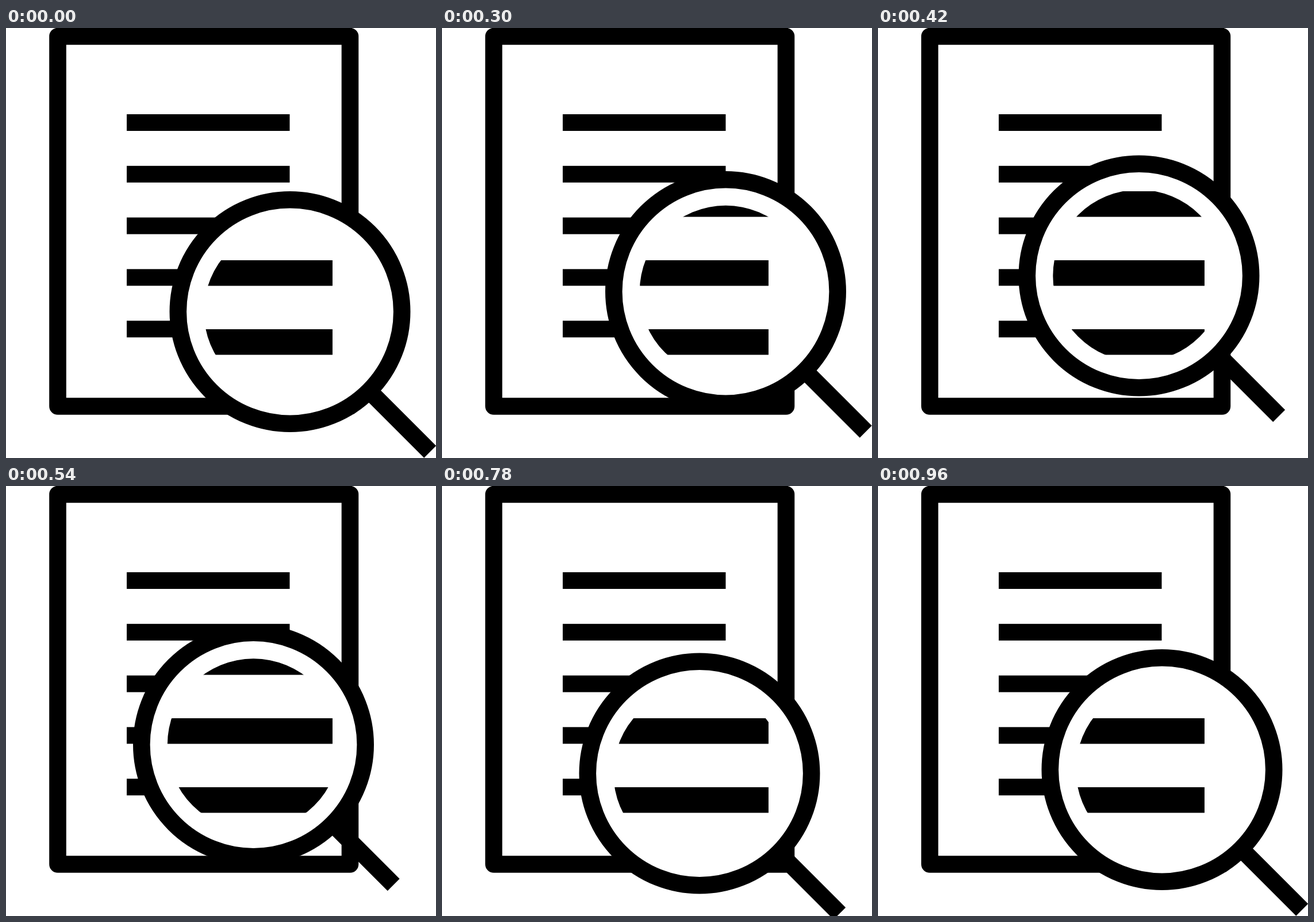
Recreate the animation shown at these times as an HTML page with a canvas. Size 748 by 748 pixels, loop 1.05 s.

```html
<!DOCTYPE html>
<html lang="en">
<head>
<meta charset="utf-8">
<title>Document search</title>
<style>
  html, body { margin: 0; height: 100%; overflow: hidden; background: #fff; }
  canvas { display: block; }
</style>
</head>
<body>
<canvas id="stage" width="748" height="748"></canvas>
<script>
const ctx = document.getElementById('stage').getContext('2d');
const LOOP = 1050, STEP = 60;

// Lens centre: [ms, x, y]
const path = [
  [120, 494, 493.5], [300, 493.5, 458.5], [420, 454, 431], [540, 430.5, 450],
  [660, 421, 478.5], [780, 448, 500], [960, 494, 493.5]
];

function slope(i, axis) {
  const a = path[Math.max(i - 1, 0)], b = path[Math.min(i + 1, path.length - 1)];
  return (b[axis] - a[axis]) / (b[0] - a[0]);
}

// Smooth cubic curve through the path points
function lensAt(ms) {
  const t = Math.min(Math.max(ms, 120), 960);
  let i = 0;
  while (i < path.length - 2 && t >= path[i + 1][0]) i++;
  const a = path[i], b = path[i + 1], span = b[0] - a[0];
  const u = (t - a[0]) / span, v = 1 - u;
  return [1, 2].map(k =>
    a[k] * v * v * (1 + 2 * u) + b[k] * u * u * (3 - 2 * u) +
    span * u * v * (slope(i, k) * v - slope(i + 1, k) * u));
}

function drawPage() {
  ctx.strokeRect(90, 14.5, 508.5, 643.5);
  for (let i = 0; i < 5; i++) ctx.fillRect(210, 150 + i * 89.8, 283.5, 29);
}

function drawLens(x, y) {
  ctx.save();
  ctx.filter = 'blur(0.6px)'; // soft edges on the glass and handle
  ctx.beginPath();
  ctx.moveTo(x + 140, y + 140);
  ctx.lineTo(x + 243.7, y + 243.7);
  ctx.stroke();

  ctx.beginPath();
  ctx.arc(x, y, 194.7, 0, Math.PI * 2);
  ctx.fillStyle = '#fff';
  ctx.fill();
  ctx.stroke();
  ctx.restore();

  // Enlarged text lines stay put while the glass moves over them
  ctx.save();
  ctx.beginPath();
  ctx.arc(x, y, 149.7, 0, Math.PI * 2);
  ctx.clip();
  ctx.fillStyle = '#000';
  for (let i = 0; i < 3; i++) ctx.fillRect(200, 284 + i * 120, 368, 44.5);
  ctx.restore();
}

function frame(now) {
  const ms = Math.floor(now % LOOP / STEP) * STEP;
  ctx.fillStyle = '#fff';
  ctx.fillRect(0, 0, 748, 748);
  ctx.fillStyle = ctx.strokeStyle = '#000';
  ctx.lineWidth = 29.6;
  ctx.lineJoin = 'round';
  drawPage();
  drawLens(...lensAt(ms));
}

const start = performance.now();
function tick() {
  frame(performance.now() - start);
  requestAnimationFrame(tick);
}
tick();
</script>
</body>
</html>
```
